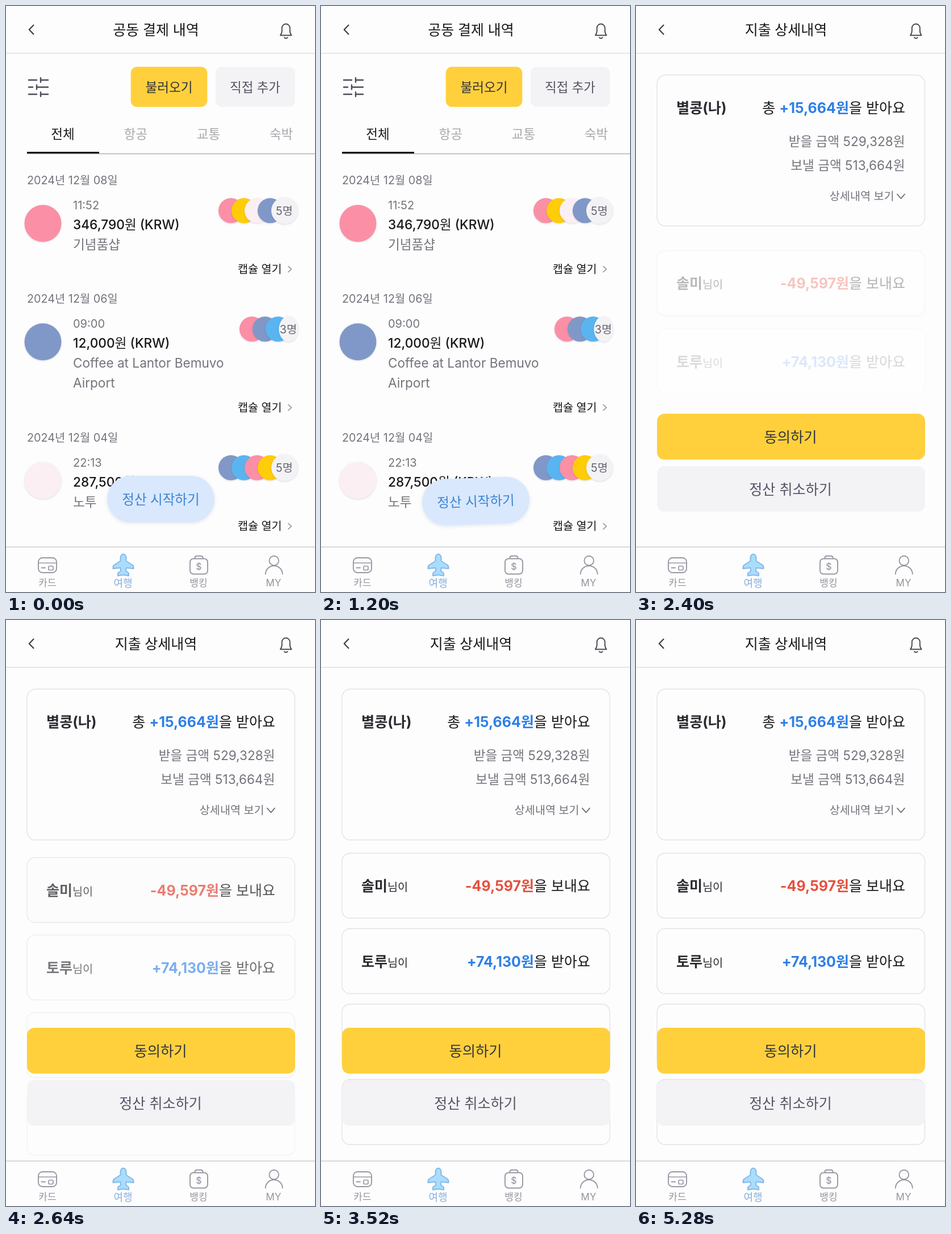
An HTML page with a canvas that plays this animation: 544 px wide and 1029 px high, repeating every 5360 ms.

```html
<!DOCTYPE html>
<html lang="ko">
<head>
<meta charset="utf-8">
<title>공동 결제 내역</title>
<style>
  html, body { margin: 0; width: 100%; height: 100%; overflow: hidden; background: #fdfdfd; }
  canvas { display: block; width: 544px; height: 1029px; }
</style>
</head>
<body>
<canvas id="stage"></canvas>
<script>
const W = 544, H = 1029, LOOP = 5360, SWITCH = 2240;
const FONT = "Inter, 'Noto Sans CJK KR', 'Noto Sans CJK', sans-serif";
const BG = '#fdfdfd', INK = '#18181c', GRAY = '#73737c', YELLOW = '#ffd03c', PALE = '#f3f3f6';
const PINK = '#fb8fa6', BLUE = '#8098c8', SKY = '#5ab4f0', GOLD = '#ffcc08', BLUSH = '#fbeff4';

const canvas = document.getElementById('stage');
const dpr = window.devicePixelRatio || 1;
canvas.width = W * dpr;
canvas.height = H * dpr;
const c = canvas.getContext('2d');

// y is the visual middle of the line
function text(str, x, y, size, color, weight = 400, align = 'left') {
  c.font = `${weight} ${size}px ${FONT}`;
  c.textAlign = align;
  c.fillStyle = color;
  c.fillText(str, x, y + size * 0.365);
  return c.measureText(str).width;
}

function box(x, y, w, h, r, fill, stroke, lw = 1.4) {
  c.beginPath();
  c.roundRect(x, y, w, h, r);
  paint(fill, stroke, lw);
}

function paint(fill, stroke, lw) {
  if (fill) { c.fillStyle = fill; c.fill(); }
  if (stroke) { c.strokeStyle = stroke; c.lineWidth = lw; c.stroke(); }
}

function path(d, stroke, lw, fill) {
  const p = new Path2D(d);
  if (fill) { c.fillStyle = fill; c.fill(p); }
  c.strokeStyle = stroke;
  c.lineWidth = lw;
  c.stroke(p);
}

function rule(x, y, w, h, color) {
  c.fillStyle = color;
  c.fillRect(x, y, w, h);
}

function shadow(color, blur, dy) {
  c.shadowColor = color;
  c.shadowBlur = blur * dpr;
  c.shadowOffsetY = dy * dpr;
}

function disc(x, y, rx, ry, fill) {
  c.save();
  shadow('rgba(40,40,70,.16)', 3, 1);
  c.beginPath();
  c.ellipse(x, y, rx, ry, 0, 0, Math.PI * 2);
  paint(fill);
  c.restore();
}

function header(title) {
  path('M48.5 33.5L40.8 41.5L48.5 49.5', '#3a3a40', 2.1);
  text(title, 264, 41.5, 25, INK, 500, 'center');
  path('M483 51.5Q485.8 48 485.8 43V38.5A7 7 0 0 1 499.8 38.5V43Q499.8 48 502.6 51.5Z' +
       'M490 55.5Q492.8 58 495.6 55.5', '#4a4a52', 1.9);
  rule(0, 82.2, W, 1.6, '#e3e3e6');
}

function nav() {
  rule(0, 950, W, 80, BG);
  rule(0, 949.2, W, 1.7, '#d4d4d8');
  const line = '#9898a4';
  box(57, 969, 32, 26, 7, null, line, 1.9);
  path('M57.5 978H88.5', line, 1.4);
  path('M62.5 986.5H69', line, 1.9);
  box(75, 983.5, 8, 7, 2, null, line, 1.7);
  path('M206.5 962.5C210 962.5 211.5 966 211.5 969.5V974.5L222.5 981.5Q225 983.5 224.5 988L211.5 986.5' +
       'L211 992L216 996V1000.5L206.5 999L197 1000.5V996L202 992L201.5 986.5L188.5 988Q188 983.5 190.5 981.5' +
       'L201.5 974.5V969.5C201.5 966 203 962.5 206.5 962.5Z', '#86b9ea', 2, '#a9ddfc');
  box(324, 970.5, 31, 27, 6, null, line, 1.9);
  path('M332.5 970V969Q332.5 965.8 336 965.8H343Q346.5 965.8 346.5 969V970', line, 1.9);
  text('$', 339.5, 984, 16, line, 500, 'center');
  path('M463.5 974A8.3 8.3 0 1 0 480.1 974A8.3 8.3 0 1 0 463.5 974' +
       'M456.8 997.5A15 14.5 0 0 1 486.8 997.5', line, 1.9);
  text('카드', 73, 1013, 17, '#94949e', 400, 'center');
  text('여행', 206, 1013.5, 18, '#84aedd', 500, 'center');
  text('뱅킹', 339, 1013, 17, '#94949e', 400, 'center');
  text('MY', 471, 1013, 17, '#94949e', 400, 'center');
}

const ITEMS = [
  { y: 306, date: '2024년 12월 08일', time: '11:52', sum: '346,790원 (KRW)', memo: ['기념품샵'],
    color: PINK, crew: [PINK, GOLD, BLUSH, BLUE], count: '5명' },
  { y: 514, date: '2024년 12월 06일', time: '09:00', sum: '12,000원 (KRW)',
    memo: ['Coffee at Lantor Bemuvo', 'Airport'],
    color: BLUE, crew: [PINK, BLUE, SKY], count: '3명' },
  { y: 757.5, date: '2024년 12월 04일', time: '22:13', sum: '287,500원 (KRW)', memo: ['노투'],
    color: BLUSH, crew: [BLUE, SKY, PINK, GOLD], count: '5명' }
];

function payment({ y, date, time, sum, memo, color, crew, count }) {
  text(date, 37, y, 19.8, GRAY);
  disc(65, y + 75.7, 32.5, 32.5, color);
  text(time, 118, y + 43.7, 20, GRAY);
  text(sum, 118, y + 78, 22.7, INK, 500);
  memo.forEach((m, i) => text(m, 118, y + 113 + i * 35, 22.6, GRAY));
  const full = crew.length === 4, cy = y + 53.3;
  crew.forEach((fill, i) => disc((full ? 396 : 433) + i * 23, cy, 22, 22, fill));
  disc(full ? 490.5 : 497.5, cy, full ? 23.5 : 17, full ? 23.5 : 22.5, PALE);
  text(count, full ? 490 : 497, cy, 19.8, '#66666f', 400, 'center');
  const ly = y + 120.7 + memo.length * 35;
  text('캡슐 열기', 408, ly, 19.7, INK, 500);
  path(`M497 ${ly - 4.5}L502.5 ${ly + 0.5}L497 ${ly + 5.5}`, '#98989e', 1.6);
}

function floatButton(t) {
  const s = (1 - Math.cos(Math.max(0, t - 80) / 3200 * Math.PI * 2)) / 2;
  c.save();
  c.translate(272.5, 865.7 + 4.6 * s);
  c.rotate(-2.5 * s * Math.PI / 180);
  c.save();
  shadow('rgba(60,90,140,.14)', 6, 2);
  box(-94.5, -40.7, 189, 81.4, 40.7, '#d9e8fd');
  c.restore();
  text('정산 시작하기', 0, 0.5, 23.6, '#3b84d4', 500, 'center');
  c.restore();
}

function listScreen(t) {
  header('공동 결제 내역');
  path('M40 130H54M61 130H74M61 126.2V133.8M40 142.5H47M54 142.5H74M54 138.7V146.3' +
       'M40 155H54M61 155H74M61 151.2V158.8', '#4b4b57', 2.4);
  box(219.7, 106.7, 134.6, 70.6, 11, YELLOW);
  text('불러오기', 287, 142.5, 22.6, '#33333d', 400, 'center');
  box(369, 107, 140, 70, 11, PALE);
  text('직접 추가', 438.5, 142.5, 22.5, '#555563', 400, 'center');
  ['전체', '항공', '교통', '숙박'].forEach((tab, i) =>
    text(tab, 100 + i * 128.2, 224.5, 22.5, i ? '#a8a8ad' : INK, i ? 400 : 500, 'center'));
  rule(37, 258.7, W, 1.6, '#b6b6ba');
  rule(37, 256, 127, 3, '#111114');
  ITEMS.forEach(payment);
  floatButton(t);
}

// amount sentence aligned to the right edge
function sentence(y, lead, sum, color, tail) {
  let x = 474 - text(tail, 474, y, 25, INK, 400, 'right');
  x -= text(sum, x, y, 25, color, 700, 'right');
  if (lead) text(lead, x, y, 25, INK, 400, 'right');
}

// cubic-bezier(0, 0, .58, 1)
function easeOut(u) {
  if (u <= 0) return 0;
  if (u >= 1) return 1;
  let lo = 0, hi = 1;
  for (let i = 0; i < 20; i++) {
    const s = (lo + hi) / 2;
    if (1.74 * s * s * (1 - s) + s * s * s < u) lo = s; else hi = s;
  }
  return lo * lo * (3 - 2 * lo);
}

const SHARES = [
  { name: '솔미', sum: '-49,597원', color: '#e5503f', tail: '을 보내요' },
  { name: '토루', sum: '+74,130원', color: '#2f7fe6', tail: '을 받아요' },
  null, null
];

function shareCard(share, i, t) {
  const p = easeOut((t - SWITCH - 12 - i * 75) / 700);
  if (!p) return;
  c.save();
  c.globalAlpha = p;
  c.translate(0, 409.5 + i * 132.5 + 30 * (1 - p));
  box(37, 0, 471.5, 114, 14, BG, '#e3e3e7');
  if (share) {
    const w = text(share.name, 71, 57.5, 25, '#2a2a30', 700);
    text('님이', 71 + w, 59.5, 19.7, '#2a2a30');
    sentence(57.5, '', share.sum, share.color, share.tail);
  }
  c.restore();
}

function detailScreen(t) {
  header('지출 상세내역');
  box(37, 121.3, 471.5, 265, 15, null, '#e3e3e7');
  text('별콩(나)', 71, 178.5, 25.2, '#2a2a30', 700);
  sentence(178.5, '총 ', '+15,664원', '#2f7fe6', '을 받아요');
  text('받을 금액 529,328원', 473.5, 237.5, 22.6, GRAY, 400, 'right');
  text('보낼 금액 513,664원', 473.5, 280, 22.6, GRAY, 400, 'right');
  text('상세내역 보기', 454.5, 333.5, 19.6, GRAY, 400, 'right');
  path('M460 330.5L466.5 338L473 330.5', '#66666f', 1.8);
  SHARES.forEach((share, i) => shareCard(share, i, t));
  box(37, 716, 472, 80.5, 13, YELLOW);
  text('동의하기', 272, 756.5, 25.3, '#33333d', 400, 'center');
  box(37, 808, 472, 80, 13, PALE);
  text('정산 취소하기', 272, 848.5, 25.1, '#555566', 400, 'center');
}

const start = performance.now();

function draw(now) {
  const t = Math.max(0, now - start) % LOOP;
  c.setTransform(dpr, 0, 0, dpr, 0, 0);
  c.lineCap = c.lineJoin = 'round';
  rule(0, 0, W, H, BG);
  if (t < SWITCH) listScreen(t); else detailScreen(t);
  nav();
  requestAnimationFrame(draw);
}
draw(start);
</script>
</body>
</html>
```
